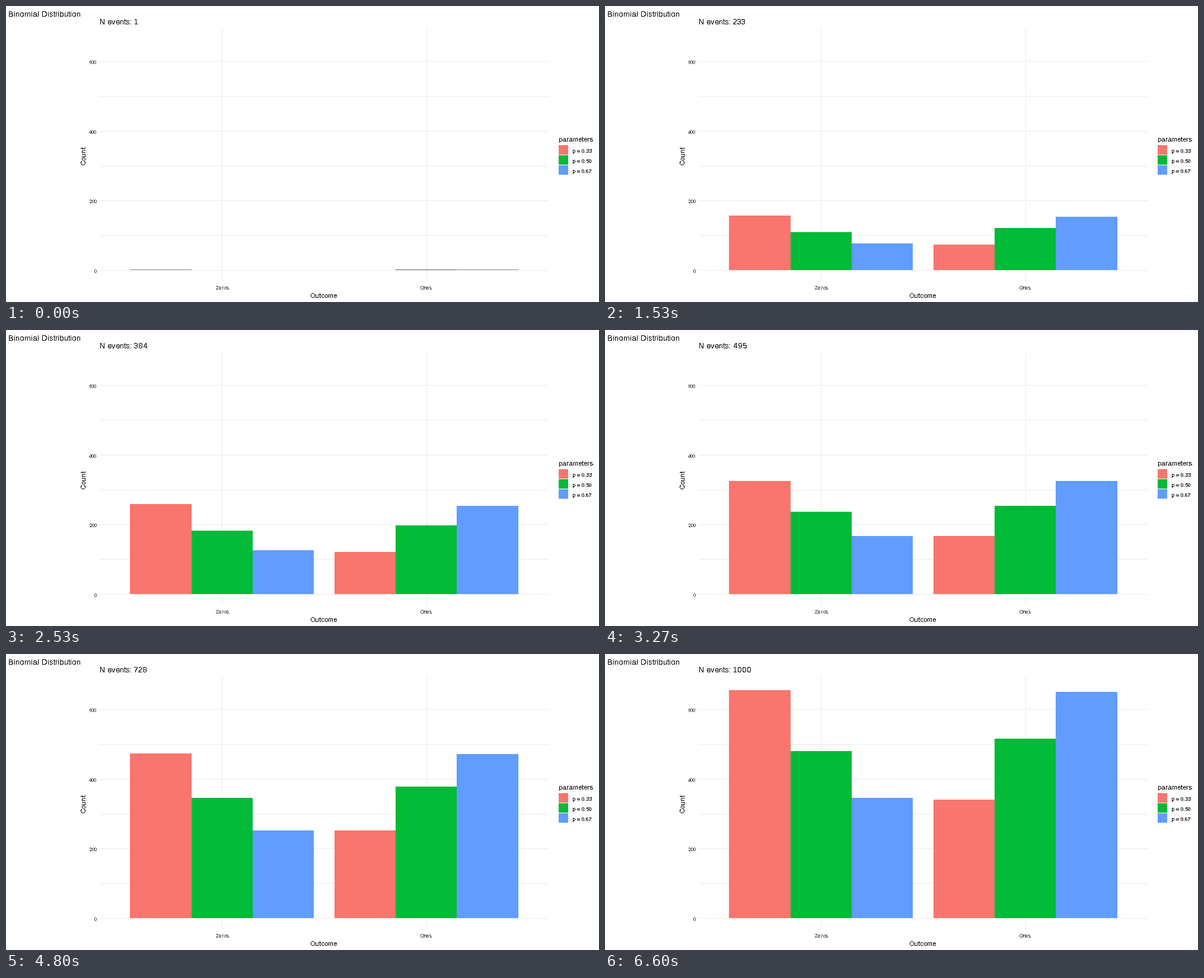
Write a matplotlib script that moves like this. It is 1000 by 500 pixels and loops after 6.67 s.

```python
import numpy as np
import matplotlib.pyplot as plt
from matplotlib.animation import FuncAnimation
from matplotlib.patches import Rectangle

plt.rcParams.update({
    "font.family": "Liberation Sans",
    "text.hinting": "force_autohint",
    "text.hinting_factor": 1,
    "text.antialiased": False,
    "toolbar": "None",
})

LOOP, STEPS, TICKS = 6670, 100, 4   # ms, counter steps, ticks per step
BASE = 446                          # pixel row of the zero line
COLORS = ["#F8766D", "#00BA38", "#619CFF"]
THIN = ["#999999", "#6A6A6A", "#999999"]   # look of a bar holding one event
LABELS = ["p = 0.33", "p = 0.50", "p = 0.67"]

# ones seen so far at a few event counts, straight lines between
EVENTS = [1, 384, 606, 869, 1000]
ONES = [[0, 123, 213, 300, 342],
        [1, 200, 313, 458, 518],
        [1, 256, 398, 562, 652]]

fig = plt.figure(figsize=(10, 5), dpi=100, facecolor="white")
ax = fig.add_axes([0, 0, 1, 1])
ax.set_xlim(0, 1000)
ax.set_ylim(500, 0)
ax.axis("off")


def box(x0, y0, x1, y1, color, z=1):
    return ax.add_patch(Rectangle((x0, y0), x1 - x0, y1 - y0, color=color,
                                  lw=0, antialiased=False, zorder=z))


def text(x, y, s, px, color="black", ha="left", **kw):
    return ax.text(x, y, s, size=px * 0.72, color=color, ha=ha,
                   va="baseline", **kw)


def edge(group, j):
    return round(209.25 + 344.4 * group + 103.32 * j)


# grid and axes
for k in range(7):
    row = round(BASE - 58.8 * k)
    box(158, row, 915, row + 1, "#EBEBEB")
    if k % 2 == 0:
        text(153, row + 5, str(100 * k), 9, "#4D4D4D", "right")
for x, name in [(364, "Zeros"), (709, "Ones")]:
    box(x, 38, x + 1, 465, "#EBEBEB")
    text(x, 479, name, 9, "#4D4D4D", "center")
text(535.5, 493, "Outcome", 11, ha="center")
text(134, 252, "Count", 11, ha="center", rotation=90, rotation_mode="anchor")

# titles and legend
text(4, 18, "Binomial Distribution", 13)
counter = text(158, 31, "", 13)
text(932, 229, "parameters", 11)
for j in range(3):
    y = 235 + 17 * j
    box(932, y, 948, y + 16, COLORS[j])
    text(955, y + 13, LABELS[j], 9)

bars = [[box(edge(g, j), BASE, edge(g, j + 1), BASE, COLORS[j], 3)
         for j in range(3)] for g in range(2)]


def set_bar(bar, count, j):
    top = min(round(446.85 - 0.5867 * count), BASE - 1) if count else BASE
    bar.set_y(top)
    bar.set_height(BASE - top)
    bar.set_color(THIN[j] if count == 1 else COLORS[j])


def update(tick):
    # each step begins one tick early, so rounded start times fall inside it
    step = min((tick + 1) // TICKS, STEPS - 1)
    n = round(1 + 999 * step / (STEPS - 1))
    counter.set_text(f"N events: {n}")
    for j in range(3):
        ones = round(float(np.interp(n, EVENTS, ONES[j])))
        set_bar(bars[0][j], n - ones, j)
        set_bar(bars[1][j], ones, j)
    return [counter, *bars[0], *bars[1]]


anim = FuncAnimation(fig, update, frames=STEPS * TICKS,
                     interval=LOOP / (STEPS * TICKS),
                     repeat=True, repeat_delay=0, blit=False)
plt.show()
```
